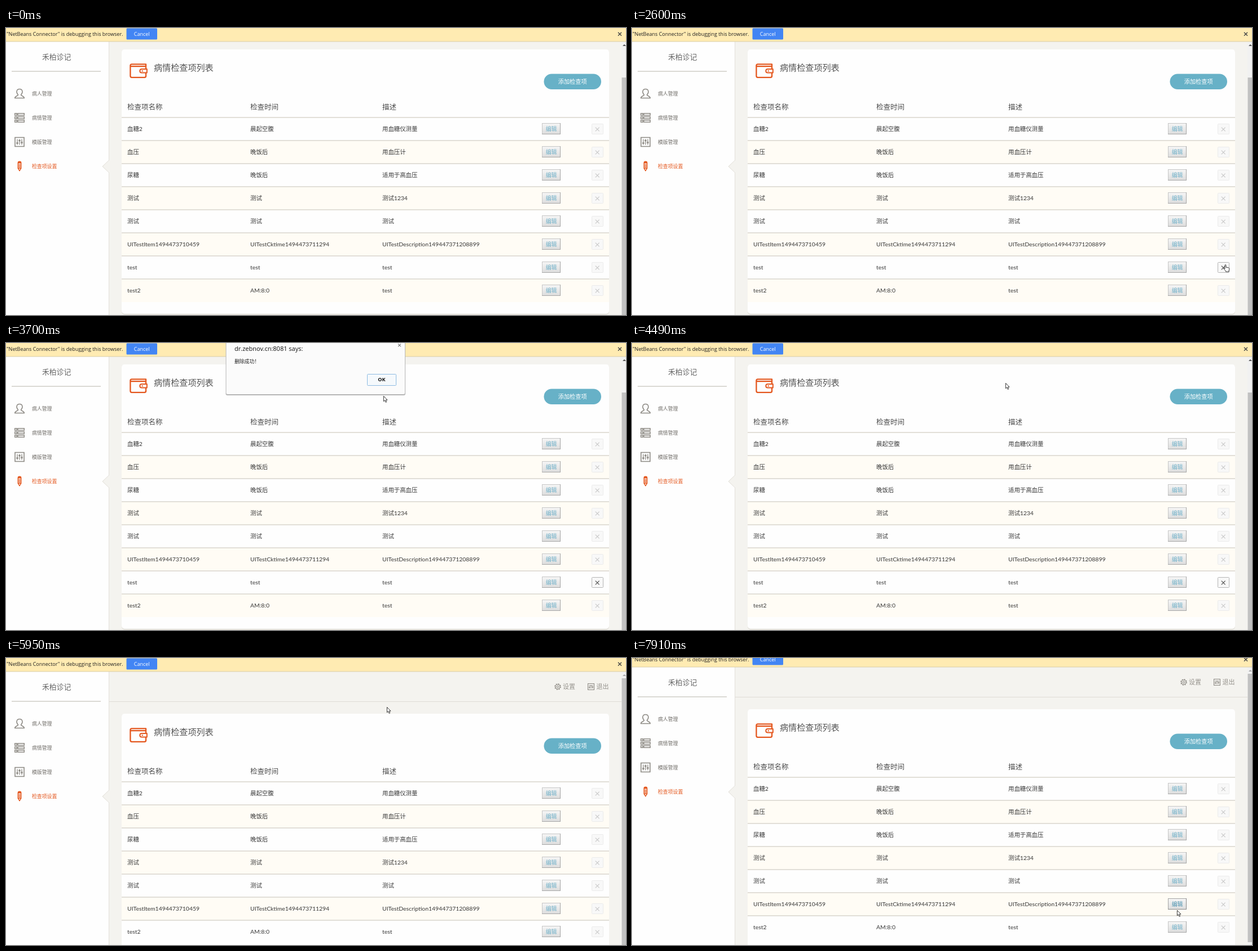
Write an HTML page with a canvas that moves like this. It is 1099 px wide and 510 px high and loops after 8000 ms.

```html
<!DOCTYPE html>
<html lang="zh-CN">
<head>
<meta charset="utf-8">
<title>病情检查项列表</title>
<style>
html, body { margin: 0; width: 100%; height: 100%; overflow: hidden; background: #f4f3ef; }
canvas { display: block; }
</style>
</head>
<body>
<canvas id="stage" width="1099" height="510"></canvas>
<script>
const ctx = document.getElementById('stage').getContext('2d');
const LOOP = 8000, RELOAD = 4790, STEP = 77.4;
const CJK = '"Noto Sans CJK SC", "Noto Sans CJK", sans-serif';
const PAGE = 'Lato, ' + CJK, CHROME = '"Open Sans", ' + CJK;
// This variant centres the full-width exclamation mark.
const MESSAGE = '"Noto Sans CJK TC", "Noto Sans CJK", sans-serif';
const GREY = '#8d8a84', ORANGE = '#e4571e', LINE = '#e2dfd8', BG = '#f4f3ef';

const ROWS = [
  ['血糖2', '晨起空腹', '用血糖仪测量'],
  ['血压', '晚饭后', '用血压计'],
  ['尿糖', '晚饭后', '适用于高血压'],
  ['测试', '测试', '测试1234'],
  ['测试', '测试', '测试'],
  ['UITestItem1494473710459', 'UITestCktime1494473711294', 'UITestDescription149447371208899'],
  ['test', 'test', 'test'],
  ['test2', 'AM:8:0', 'test']
];
const DELETED = 6, EDITED = 5, COLUMNS = [215, 433, 667];

// Pointer path: time, x, y
const PATH = [
  [370, 991, 488], [755, 891, 427], [835, 891, 427], [910, 887, 426], [1230, 887, 426],
  [1650, 960, 397], [2070, 1025, 409], [2450, 1050, 419], [2600, 1050, 420], [3070, 1050, 420],
  [3400, 850, 240], [3698, 669, 94], [3840, 662, 71], [5880, 662, 71], [5943, 675, 87],
  [6300, 830, 285], [6560, 940, 420], [6717, 966, 448], [LOOP, 966, 448]
];

const clamp = v => Math.max(0, Math.min(1, v));
const ramp = (t, a, b) => clamp((t - a) / (b - a));
const within = (t, a, b) => t >= a && t < b;

function rect(x, y, w, h, color) {
  ctx.fillStyle = color;
  ctx.fillRect(x, y, w, h);
}
function rounded(x, y, w, h, r, fill, border) {
  ctx.beginPath();
  ctx.roundRect(x, y, w, h, r);
  ctx.fillStyle = fill;
  ctx.fill();
  if (border) { ctx.strokeStyle = border; ctx.lineWidth = 1; ctx.stroke(); }
}
function text(str, x, y, size, color, { align = 'left', weight = 400, font = PAGE } = {}) {
  ctx.font = `${weight} ${size}px ${font}`;
  ctx.textAlign = align;
  ctx.fillStyle = color;
  ctx.fillText(str, x, y);
}
function stroke(d, color, width) {
  ctx.strokeStyle = color;
  ctx.lineWidth = width;
  ctx.stroke(new Path2D(d));
}
function at(x, y, draw, scale = 1) {
  ctx.save();
  ctx.translate(x, y);
  ctx.scale(scale, scale);
  draw();
  ctx.restore();
}
function cross(x, y, r, color, width) {
  at(x, y, () => stroke(`M${-r} ${-r}L${r} ${r}M${r} ${-r}L${-r} ${r}`, color, width));
}

// Icons are centred on the origin, except the wallet.
function userIcon() {
  stroke('M-2.5 2.2C-6.4 -1.5 -5.8 -8 0 -8S6.4 -1.5 2.5 2.2C2.5 4.5 8.3 4.2 8.3 8H-8.3C-8.3 4.2 -2.5 4.5 -2.5 2.2Z', GREY, 1.5);
}
function listIcon() {
  for (const y of [-6, 0, 6]) {
    stroke(`M-8.3 ${y - 1.8}H-4.7V${y + 1.8}H-8.3ZM-3 ${y - 1.8}H8.3V${y + 1.8}H-3Z`, GREY, 1.4);
  }
}
function slidersIcon() {
  stroke('M-8 -8H8V8H-8Z', GREY, 1.6);
  stroke('M-4 -5V5M0 -5V5M4 -5V5', GREY, 1.3);
  stroke('M-5.7 2H-2.3M-1.7 -2.5H1.7M2.3 1H5.7', GREY, 2.4);
}
function pencilIcon() {
  stroke('M-2.7 -6V4L0 8.2L2.7 4V-6Q2.7 -8.2 0 -8.2T-2.7 -6Z', ORANGE, 1.4);
  rect(-2.7, -8, 5.4, 3, ORANGE);
  stroke('M-0.9 -4V4M0.9 -4V4', ORANGE, 1.1);
  stroke('M-2.5 4H2.5', ORANGE, 1);
}
function gearIcon() {
  ctx.strokeStyle = GREY;
  const ring = (r, width, dash = []) => {
    ctx.lineWidth = width;
    ctx.setLineDash(dash);
    ctx.beginPath();
    ctx.arc(0, 0, r, 0, 7);
    ctx.stroke();
  };
  ring(4, 1.1);
  ring(1.7, 1);
  ring(5.1, 1.4, [2.1, 1.9]);
  ctx.setLineDash([]);
}
function walletIcon() {
  ctx.lineJoin = 'round';
  stroke('M29 11V2.4H4Q1.4 2.4 1.4 5V23Q1.4 25.8 4 25.8H26.5Q29 25.8 29 23.5V18M2 6.2H29', ORANGE, 2.3);
  stroke('M30.8 11H21.5Q18.3 11 18.3 14.3T21.5 17.6H30.8Z', ORANGE, 2);
  rect(21.5, 13.4, 2.6, 1.8, ORANGE);
  ctx.lineJoin = 'miter';
}

function sidebar() {
  rect(0, 24, 182, 520, '#fefefe');
  rect(182, 24, 1, 520, '#e2dfd8');
  text('禾柏诊记', 64, 55.5, 12.8, '#666');
  rect(10, 76, 158, 2, '#dbd9d4');
  const items = [['病人管理', userIcon], ['病情管理', listIcon], ['模版管理', slidersIcon], ['检查项设置', pencilIcon]];
  items.forEach(([label, icon], i) => {
    const y = 117 + 43 * i;
    at(24, y - 0.5, icon);
    text(label, 46, y + 3.2, 8.9, icon === pencilIcon ? ORANGE : '#706d68');
  });
  ctx.fillStyle = BG;
  ctx.fill(new Path2D('M184 234L171 246L184 258Z'));
  stroke('M182.5 235L171 246L182.5 257', '#e2dfd8', 1);
}

function editButton(y, hover, pressed) {
  const shade = ctx.createLinearGradient(0, y - 10, 0, y + 10);
  shade.addColorStop(0, pressed ? '#d2d2d2' : '#f6f6f6');
  shade.addColorStop(1, pressed ? '#e6e6e6' : '#dcdcdc');
  rect(950, y - 10, 33, 20, hover ? '#8a8a8a' : '#a6a6a6');
  rect(950, y - 10, 32, 19, hover ? '#a5a5a5' : '#c6c6c6');
  rect(951, y - 9, 31, 18, shade);
  text('编辑', 966.5, y + 3.7, 9.8, hover ? '#4c93b0' : '#71b1c9', { align: 'center', weight: 500 });
}

function deleteButton(y, hover, pressed) {
  rounded(1038.5, y - 8.5, 20, 18, 1, pressed ? '#e9e9e9' : '#f8f8f8', hover ? '#b5b5b5' : '#ebebeb');
  cross(1048.2, y + 1, 3.4, hover ? '#555' : '#cbcbcb', 1.3);
}

function content(t) {
  const reloaded = t >= RELOAD;
  const rows = reloaded ? ROWS.filter((_, i) => i !== DELETED) : ROWS;
  ctx.save();
  ctx.translate(0, reloaded ? 0 : -61);

  rect(183, 77, 908, 1, '#dfdcd6');
  at(978, 51, gearIcon);
  text('设置', 987, 55, 11, '#96938d');
  at(1037, 51, slidersIcon, 0.68);
  text('退出', 1046.5, 55, 11, '#96938d');

  const bottom = 241 + 41 * rows.length;
  rounded(205, 100, 864, bottom - 99, 5, '#d8d4ca');
  rounded(205, 99, 864, bottom - 99, 5, '#fefefe');
  at(219, 123, walletIcon);
  text('病情检查项列表', 262, 136.7, 15.1, '#555');
  rounded(953.5, 142.5, 101.5, 27.5, 13.75, '#67b1c7');
  text('添加检查项', 1004.2, 160, 10.2, '#fff', { align: 'center' });
  ['检查项名称', '检查时间', '描述'].forEach((label, i) => text(label, COLUMNS[i], 205.5, 12.5, '#4a4a4a'));

  rows.forEach((cells, i) => {
    const top = 220 + 41 * i, y = top + 20;
    if (i % 2) rect(205, top, 864, 41, '#fffcf5');
    rect(205, top - 1, 864, 2, LINE);
    cells.forEach((cell, c) => text(cell, COLUMNS[c], y + 4, 10.4, '#383838'));
    const editing = reloaded && i === EDITED;
    editButton(y, editing && t >= 6717, editing && within(t, 7420, 7570));
    const deleting = !reloaded && i === DELETED;
    deleteButton(y, deleting && t >= 2590, deleting && within(t, 2840, 2920));
  });
  ctx.restore();
}

function scrollbar(reloaded) {
  rect(1091, 24, 8, 520, '#f1f1f1');
  rect(1091.5, reloaded ? 36 : 88, 7.5, 477, '#c1c1c1');
  ctx.fillStyle = reloaded ? '#a3a3a3' : '#505050';
  ctx.fill(new Path2D('M1093 32L1096 29L1099 32Z'));
}

function infobar() {
  rect(0, 0, 1099, 24, '#ffebb2');
  rect(0, 23.5, 1099, 1, '#d9cda6');
  text('"NetBeans Connector" is debugging this browser.', 1, 14, 9, '#222', { font: CHROME });
  rounded(213.5, 0.5, 54.5, 20, 1.5, '#4285f4');
  text('Cancel', 240.7, 14.2, 9, '#fff', { align: 'center', font: CHROME });
  cross(1088, 10.7, 3, '#4a4a4a', 1.5);
}

function dialog(t) {
  const alpha = ramp(t, 3040, 3200) * (1 - ramp(t, 4250, 4480));
  if (!alpha) return;
  const pressed = within(t, 4080, 4250);
  ctx.save();
  ctx.globalAlpha = alpha;
  rounded(389.5, -4, 318.5, 97, 3, '#b5b5b5');
  rounded(390.5, -4, 316.5, 95, 2, '#fbfbfb');
  text('dr.zebnov.cn:8081 says:', 405, 14, 11, '#111', { font: CHROME });
  text('删除成功！', 405, 36.3, 8.8, '#222', { font: MESSAGE });
  cross(697.5, 4, 2.4, '#777', 1.1);
  rounded(640.5, 55.5, 51, 20, 1, pressed ? '#dcebf8' : '#f5f9fc', '#8dbbe2');
  text('OK', 665.8, 68.4, 9, '#111', { align: 'center', weight: 700, font: CHROME });
  ctx.restore();
}

function pointerAt(t) {
  const i = Math.max(1, PATH.findIndex(p => p[0] >= t));
  const [t0, x0, y0] = PATH[i - 1], [t1, x1, y1] = PATH[i];
  const k = ramp(t, t0, t1);
  return [Math.round(x0 + (x1 - x0) * k), Math.round(y0 + (y1 - y0) * k)];
}

function pointer(t) {
  if (t < 370) return;
  const sampled = 370 + STEP * Math.floor((t - 362) / STEP);
  const [x, y] = pointerAt(sampled);
  const shape = within(t, 2590, 3100)
    ? 'M1 1.2Q2.2 0 3 1.4V5.2L7.6 6Q9 6.4 8.8 8.2L8 11.8V13H2.5V11.8L-1 8Q-1.6 6.8 -0.2 6.8L1 7.8Z'
    : 'M0.4 0.4V9.8L2.5 7.8L4.1 11.4L5.7 10.7L4.1 7.2H7Z';
  at(x, y, () => {
    ctx.fillStyle = '#fff';
    ctx.fill(new Path2D(shape));
    stroke(shape, '#222', 0.9);
  });
}

function draw(t) {
  rect(0, 0, 1099, 510, BG);
  ctx.save();
  ctx.translate(0, t >= 7910 ? -8 : t >= 7800 ? -3 : 0);
  content(t);
  sidebar();
  scrollbar(t >= RELOAD);
  infobar();
  dialog(t);
  ctx.restore();
  pointer(t);
}

const start = performance.now();
function frame() {
  draw((performance.now() - start) % LOOP);
  requestAnimationFrame(frame);
}
frame();
</script>
</body>
</html>
```
